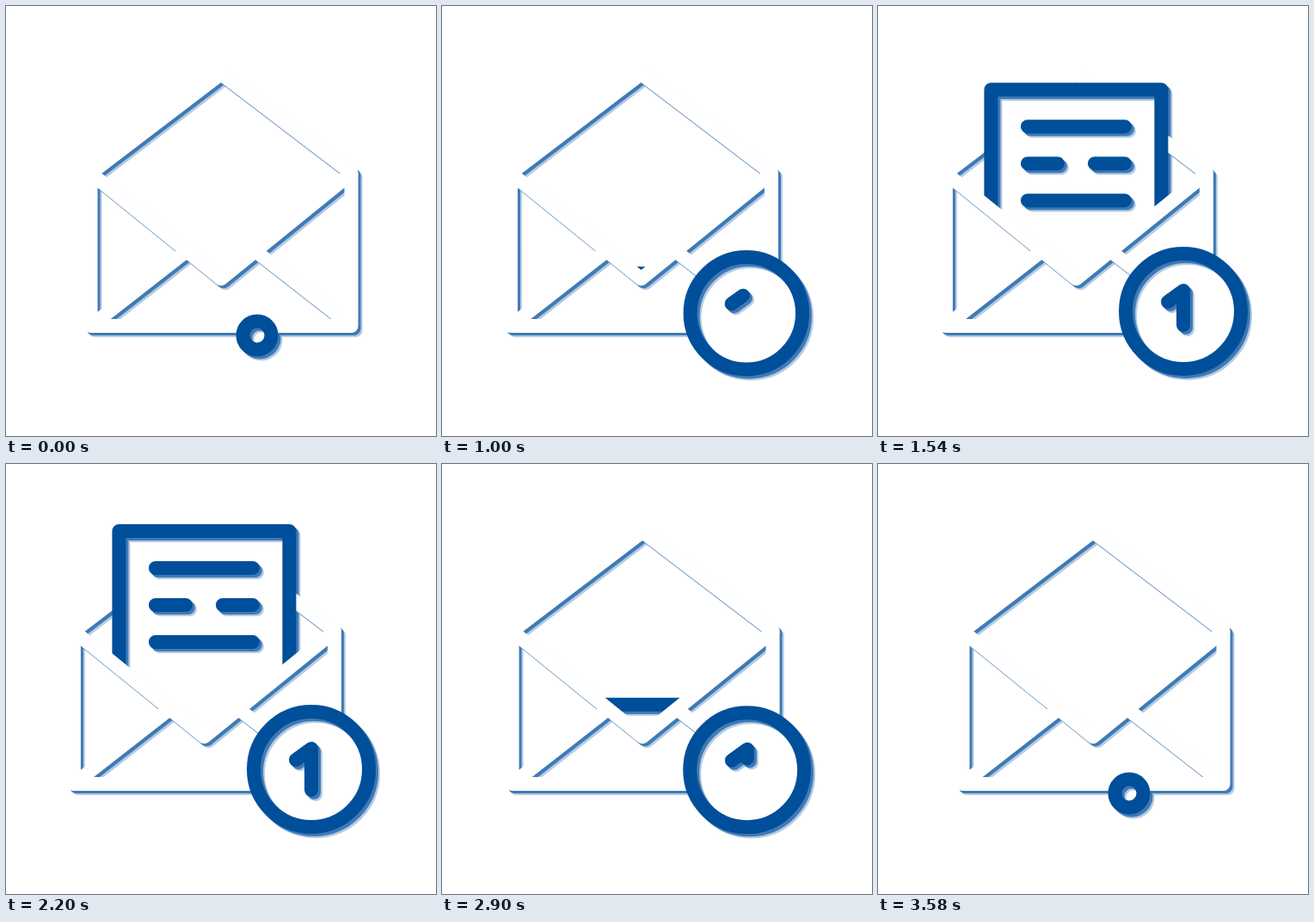
Animation, 500 px wide and 500 px high, one loop 3600 ms. Source, as an HTML page:

```html
<!DOCTYPE html>
<html lang="en">
<head>
<meta charset="utf-8">
<title>New mail</title>
<style>
  @property --slide { syntax: "<length>"; inherits: true; initial-value: 0px; }
  @property --sheet { syntax: "<length>"; inherits: true; initial-value: 365px; }
  @property --hide { syntax: "<number>"; inherits: true; initial-value: 100.02; }
  @property --grow { syntax: "<number>"; inherits: true; initial-value: 0; }

  html, body { margin: 0; width: 100%; height: 100%; overflow: hidden; background: #fff; }

  svg {
    display: block;
    width: 500px;
    height: 500px;
    --cx: calc(292px + 112px * var(--grow) - 49px * var(--grow) * var(--grow));
    --cy: calc(383px - 22px * var(--grow) - 6px * var(--grow) * var(--grow));
    --r: calc(16.5px + 76.15px * var(--grow) - 25.65px * var(--grow) * var(--grow));
    animation: slide 3.6s infinite, sheet 3.6s infinite, digit 3.6s infinite, grow 3.6s infinite;
  }

  .line { fill: none; stroke-width: 16px; stroke-linecap: round; stroke-linejoin: round; }
  .white { stroke: #fff; }
  .blue { stroke: #004f9a; }
  .mail { transform: translateX(var(--slide)); }
  .sheet { transform: translateY(var(--sheet)); }
  .badge { cx: var(--cx); cy: var(--cy); r: var(--r); }
  .disc { cx: var(--cx); cy: var(--cy); r: calc(var(--r) + 5px); }
  .digit {
    transform: translate(calc(var(--cx) - 355px + 12.5px * (1 - var(--grow))), calc(var(--cy) - 355px));
    stroke-dasharray: 100 200;
    stroke-dashoffset: var(--hide);
  }

  @keyframes slide {
    0% { --slide: 0px; animation-timing-function: ease-in-out; }
    33.333%, 73.889% { --slide: -19.6px; animation-timing-function: ease-in-out; }
    100% { --slide: 0px; }
  }
  @keyframes sheet {
    0%, 16.667% { --sheet: 365px; animation-timing-function: cubic-bezier(.55, 0, .08, 1); }
    56.111%, 60.833% { --sheet: 70px; animation-timing-function: cubic-bezier(.86, 0, .53, 1); }
    88.889%, 100% { --sheet: 365px; }
  }
  @keyframes digit {
    0%, 15.556% { --hide: 100.02; animation-timing-function: cubic-bezier(.46, 0, .33, 1); }
    56.111%, 60.833% { --hide: 0; animation-timing-function: cubic-bezier(1, 0, .36, 1); }
    91.667%, 100% { --hide: 100.02; }
  }
  @keyframes grow {
    0% { --grow: 0; animation-timing-function: cubic-bezier(.2, 0, .05, 1); }
    44.444%, 75% { --grow: 1; animation-timing-function: cubic-bezier(.95, 0, .8, 1); }
    99.444%, 100% { --grow: 0; }
  }
</style>
</head>
<body>
<svg viewBox="0 0 500 500">
  <defs>
    <!-- two hard, stacked shadows -->
    <filter id="depth" filterUnits="userSpaceOnUse" x="0" y="0" width="500" height="500" color-interpolation-filters="sRGB">
      <feFlood flood-color="#407ab5"/>
      <feComposite in2="SourceAlpha" operator="in"/>
      <feOffset dx="3" dy="3" result="mid"/>
      <feFlood flood-color="#b3cbe4"/>
      <feComposite in2="SourceAlpha" operator="in"/>
      <feOffset dx="5" dy="5" result="far"/>
      <feMerge>
        <feMergeNode in="far"/>
        <feMergeNode in="mid"/>
        <feMergeNode in="SourceGraphic"/>
      </feMerge>
    </filter>
    <mask id="offBadge" maskUnits="userSpaceOnUse" x="0" y="0" width="500" height="500">
      <rect width="500" height="500" fill="#fff"/>
      <circle class="disc" fill="#000"/>
    </mask>
    <mask id="offSheet" maskUnits="userSpaceOnUse" x="0" y="0" width="500" height="500">
      <rect width="500" height="500" fill="#fff"/>
      <rect class="sheet" x="146" y="3" width="208" height="400" fill="#000"/>
    </mask>
    <clipPath id="pocket">
      <path d="M98.5 194.5L250 317.3L401.5 194.5V-100H98.5Z"/>
    </clipPath>
  </defs>

  <g filter="url(#depth)">
    <g mask="url(#offBadge)">
      <g class="mail">
        <g mask="url(#offSheet)">
          <path class="line white" d="M98.5 194.5L250 79L401.5 194.5"/>
        </g>
        <g clip-path="url(#pocket)">
          <g class="sheet">
            <path class="line blue" d="M151 400V8H349V400"/>
            <path class="line blue" d="M193.5 51H306.5M193.5 94H228.5M271.5 94H306.5M193.5 137H306.5"/>
          </g>
        </g>
        <path class="line white" d="M98.5 194.5V372H401.5V194.5L250 317.3ZM98.5 372L210 285M401.5 372L290 285"/>
      </g>
    </g>
    <circle class="line blue badge"/>
    <path class="line blue digit" pathLength="100" d="M337 344L355 331V379"/>
  </g>
</svg>
</body>
</html>
```
